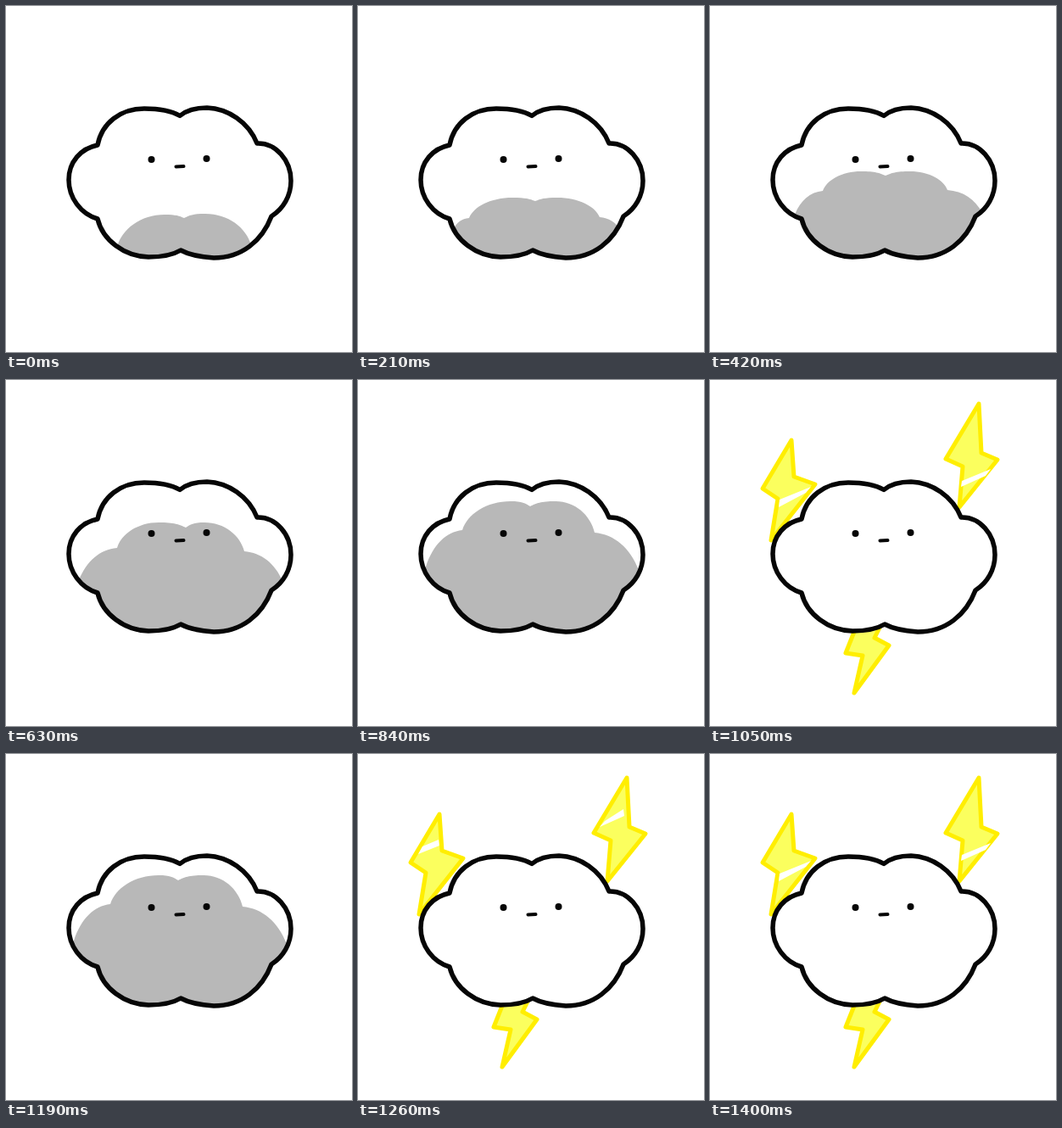
An HTML page that plays this animation: 408x408 px, repeating every 1.47 s.

```html
<!DOCTYPE html>
<html lang="en">
<head>
<meta charset="utf-8">
<title>Storm cloud</title>
<style>
  html, body { margin: 0; width: 100%; height: 100%; overflow: hidden; background: #fff; }
  svg { display: block; width: 100%; height: 100%; }
  .bolt { fill: #fbff5e; stroke: #ffee00; stroke-width: 5; stroke-linejoin: round; }
  .line { fill: none; stroke: #060606; stroke-width: 5.5; stroke-linejoin: round; stroke-linecap: round; }
</style>
</head>
<body>
<svg viewBox="0 0 408 408">
  <defs>
    <path id="cloud" d="M108 164C113 138 135 121 163 121C180 121 194 123 205 129.500
      C214 122 226 120 237 120C262 121 286 137 296 162C318 161 336 182 336 206
      C336 224 327 239 313 248C302 277 278 297 245 297C231 296 217 294 206 288
      C196 294 184 296 168 296C139 295 114 276 108 251C88 245 74 226 74 205
      C74 184 88 168 108 164Z"/>
    <clipPath id="inside"><use href="#cloud"/></clipPath>
  </defs>
  <g id="bolts">
    <path class="bolt" d="M96 71L62 128L80 140L72 189L124 123L99 114Z"/>
    <path class="bolt" d="M317 28L278 93L298 102L294 150L339 94L320 86Z"/>
    <path class="bolt" d="M176 282L160 322L180 325L170 369L211 313L194 304L202 288Z"/>
    <path id="shine" fill="#fff"/>
  </g>
  <use href="#cloud" fill="#fff"/>
  <path id="rain" fill="#b8b8b8" clip-path="url(#inside)"/>
  <use href="#cloud" class="line"/>
  <g fill="#060606">
    <circle cx="171.500" cy="181" r="4"/>
    <circle cx="236.500" cy="180" r="4"/>
  </g>
  <path class="line" style="stroke-width:4" d="M200.500 189.500L209.500 189"/>
</svg>
<script>
const TICK = 70, LOOP = 1470, FULL = 8;

// Upper edge of the grey fill, left to right, at every second drawing:
// side end, notch, hump top, valley, hump top, notch, side end.
const LEVELS = [
  [118, 296, 131, 284, 187, 246, 210, 250, 235, 245, 289, 282, 300, 296],
  [112, 264, 131, 250, 182, 226, 209, 230, 235, 226, 285, 249, 309, 264],
  [100, 246, 133, 218, 178, 195, 207, 200, 236, 195, 280, 217, 321, 244],
  [86, 236, 131, 198, 180, 168, 212, 174, 234, 168, 281, 202, 326, 237],
  [80, 220, 123, 177, 180, 143, 203, 149, 233, 143, 279, 180, 331, 224]
];

const SHINE_HIGH = 'M76 109L95 101L96 108L71 118ZM291 79L313 65L314 73L285 86Z';
const SHINE_LOW = 'M82 141L119 126L113 133L81 150ZM297 119L331 105L325 113L296 126Z';

const byId = id => document.getElementById(id);
const bolts = byId('bolts'), shine = byId('shine'), rain = byId('rain');

// Control points of an arc from its low end to its high end.
function arc(low, high, lowX, lowY, highX, highY) {
  const w = high[0] - low[0], h = low[1] - high[1];
  return [
    [low[0] + w * lowX, high[1] + h * lowY],
    [high[0] - w * highX, high[1] + h * highY]
  ];
}
const lobe = (low, high) => arc(low, high, 0.2, 0.4, 0.45, 0.05);
const hump = (low, high) => arc(low, high, 0.1, 0.45, 0.5, 0);
const dip = (low, high) => arc(low, high, 0.25, 0.4, 0.6, 0);

function rainPath(drawing) {
  const i = Math.min(Math.floor(drawing / 2), LEVELS.length - 2);
  const part = drawing / 2 - i;
  const v = LEVELS[i].map((a, k) => a + (LEVELS[i + 1][k] - a) * part);
  const [endL, notchL, topL, valley, topR, notchR, endR] =
    Array.from({ length: 7 }, (_, k) => [v[2 * k], v[2 * k + 1]]);
  const up = (make, low, high) => 'C' + [...make(low, high), high].join(' ');
  const down = (make, high, low) => 'C' + [...make(low, high).reverse(), low].join(' ');
  return 'M60 310L' + endL +
    up(lobe, endL, notchL) + up(hump, notchL, topL) + down(dip, topL, valley) +
    up(dip, valley, topR) + down(hump, topR, notchR) + down(lobe, notchR, endR) +
    'L350 310Z';
}

let shown = -1;
function draw(now) {
  // Fourteen drawings spread over twenty-one ticks.
  const drawing = Math.floor(Math.floor((now % LOOP) / TICK) * 2 / 3);
  if (drawing !== shown) {
    shown = drawing;
    const flash = drawing > FULL && drawing !== 11;
    bolts.style.display = flash ? '' : 'none';
    rain.style.display = flash ? 'none' : '';
    shine.setAttribute('d', drawing === 9 || drawing === 12 ? SHINE_HIGH : SHINE_LOW);
    rain.setAttribute('d', rainPath(Math.min(drawing, FULL)));
  }
}

const start = performance.now();
function frame() {
  draw(performance.now() - start);
  requestAnimationFrame(frame);
}
frame();
</script>
</body>
</html>
```
